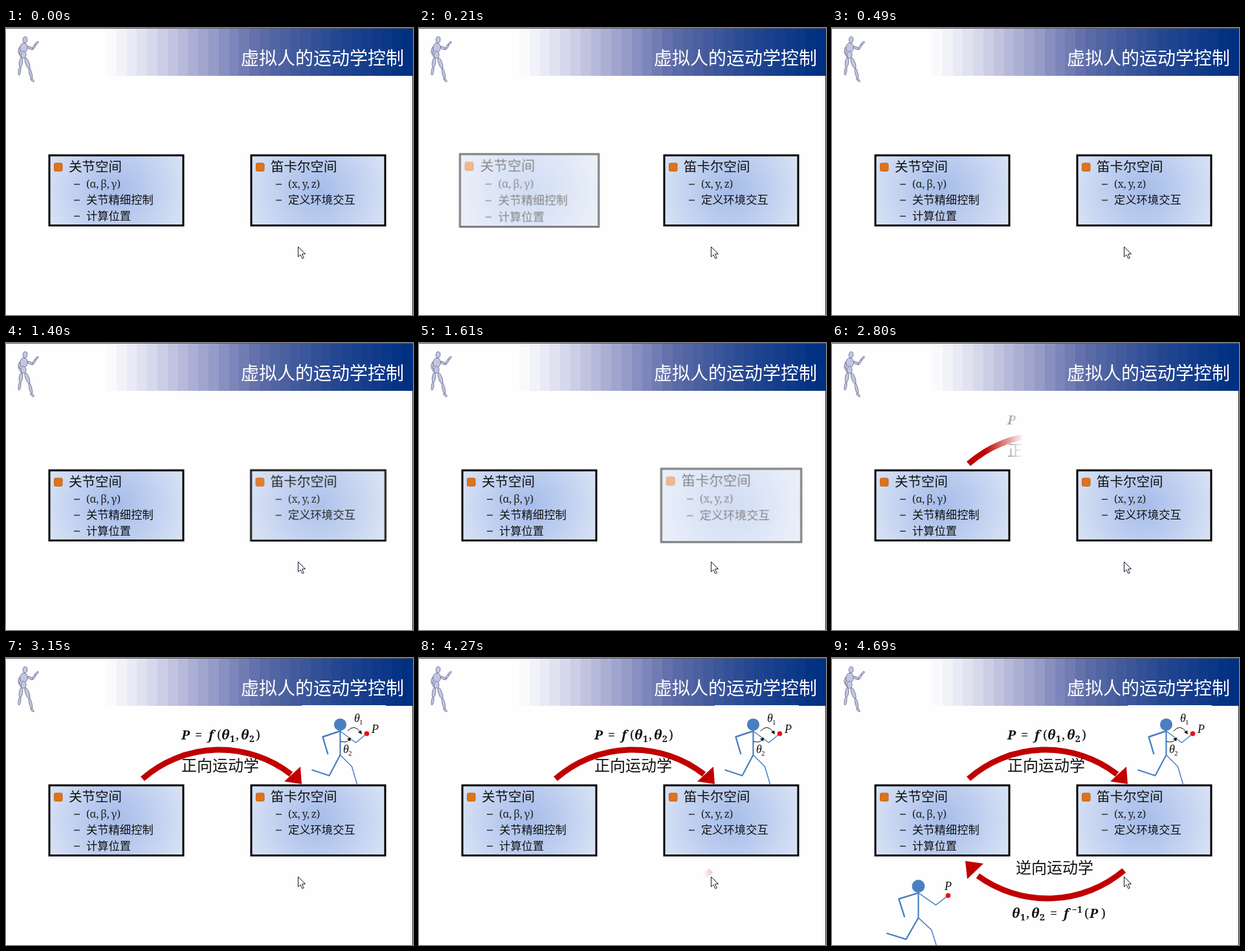
An HTML page with a canvas for the animation above (5530 ms loop, 629 px wide and 444 px high).

```html
<!DOCTYPE html>
<html lang="zh-CN">
<head>
<meta charset="utf-8">
<style>
html, body { margin: 0; width: 100%; height: 100%; overflow: hidden; background: #fff; }
canvas { display: block; }
</style>
</head>
<body>
<canvas id="stage" width="629" height="444"></canvas>
<script>
const W = 629, H = 444, LOOP = 5530, STEP = 70;
const SANS = '"Noto Sans CJK SC", "Noto Sans CJK", sans-serif';
const SERIF = '"Noto Serif", serif';
const TIMES = '"Liberation Serif", serif';
const ctx = document.getElementById('stage').getContext('2d');

function layer(draw) {
  const c = document.createElement('canvas');
  c.width = W;
  c.height = H;
  draw(c.getContext('2d'));
  return c;
}

function text(g, s, x, y, font, color = '#111') {
  g.font = font;
  g.fillStyle = color;
  g.fillText(s, x, y);
}

function path(g, pts, color, width) {
  g.beginPath();
  pts.forEach(([x, y]) => g.lineTo(x, y));
  g.strokeStyle = color;
  g.lineWidth = width;
  g.stroke();
}

function fillPath(g, pts, color) {
  g.beginPath();
  pts.forEach(([x, y]) => g.lineTo(x, y));
  g.closePath();
  g.fillStyle = color;
  g.fill();
}

function disc(g, x, y, r, color) {
  g.beginPath();
  g.arc(x, y, r, 0, 7);
  g.fillStyle = color;
  g.fill();
}

// Tapered, outlined body part between two joints
function limb(g, x1, y1, x2, y2, r) {
  const len = Math.hypot(x2 - x1, y2 - y1) / 2;
  g.beginPath();
  g.ellipse((x1 + x2) / 2, (y1 + y2) / 2, len, r, Math.atan2(y2 - y1, x2 - x1), 0, 7);
  g.fillStyle = '#c3c6e2';
  g.fill();
  g.strokeStyle = '#5d6080';
  g.lineWidth = 0.8;
  g.stroke();
}

function mannequin(g) {
  limb(g, 22, 29, 20, 39, 1.8);
  limb(g, 20, 38, 25, 46, 1.4);
  limb(g, 24, 46, 22, 61, 2.6);
  limb(g, 22, 60, 20, 73, 1.8);
  limb(g, 30, 46, 36, 63, 2.8);
  limb(g, 36, 62, 40, 79, 2);
  limb(g, 38, 78, 43, 83, 1.5);
  limb(g, 33, 29, 42, 33, 1.8);
  limb(g, 41, 33, 46, 25, 1.5);
  limb(g, 45, 26, 50, 21, 1.4);
  limb(g, 28, 23, 27, 38, 5.8);
  limb(g, 27, 36, 27, 47, 4);
  limb(g, 29, 23, 30, 13.5, 3.3);
}

const background = layer(g => {
  g.fillStyle = '#fefefe';
  g.fillRect(0, 0, W, H);

  const stops = [[0, 250, 250, 253], [.1, 226, 227, 241], [.35, 148, 153, 199],
    [.5, 94, 108, 168], [.75, 38, 72, 146], [1, 0, 48, 130]];
  const bands = 30;
  for (let i = 0; i < bands; i++) {
    const p = i / (bands - 1);
    const n = Math.max(1, stops.findIndex(s => s[0] >= p));
    const [a, b] = [stops[n - 1], stops[n]];
    const k = (p - a[0]) / (b[0] - a[0]);
    const rgb = [1, 2, 3].map(c => Math.round(a[c] + (b[c] - a[c]) * k));
    const x = Math.round(155 + i * 474 / bands);
    g.fillStyle = `rgb(${rgb})`;
    g.fillRect(x, 0, W - x, 74);
  }
  g.fillStyle = '#55565c';
  g.fillRect(0, 0, W, 1);
  g.fillStyle = '#222';
  g.fillRect(628, 74, 1, H - 74);

  text(g, '虚拟人的运动学控制', 363, 57, '28px ' + SANS, '#fff');
  mannequin(g);
});

function panel(g, x, title, triple, items) {
  const glow = g.createRadialGradient(x + 104, 251, 0, x + 104, 251, 118);
  glow.addColorStop(0, '#a5bce9');
  glow.addColorStop(.45, '#bccdef');
  glow.addColorStop(1, '#dbe4f5');
  g.fillStyle = glow;
  g.fillRect(x + 1, 197, 207, 109);
  g.strokeStyle = '#000';
  g.lineWidth = 3;
  g.strokeRect(x + 1, 197, 207, 108.5);

  g.beginPath();
  g.roundRect(x + 8.5, 209, 12.5, 12.5, 2);
  g.fillStyle = '#de731b';
  g.fill();
  g.strokeStyle = '#c4641a';
  g.lineWidth = 1;
  g.stroke();

  text(g, title, x + 31, 222, '20.5px ' + SANS);
  text(g, triple, x + 58, 247, '16px ' + SERIF, '#222');
  items.forEach((s, i) => text(g, s, x + 58, 272 + i * 24.5, '17.3px ' + SANS));
  g.fillStyle = '#333';
  for (let i = 0; i <= items.length; i++) g.fillRect(x + 39, 241 + i * 24.7, 9, 1.5);
}

const thin = '\u2009';
const panels = [
  { x: 66, start: 70, end: 490, args: ['关节空间', `(α,${thin}β,${thin}γ)`, ['关节精细控制', '计算位置']] },
  { x: 378, start: 1400, end: 1890, args: ['笛卡尔空间', `(x,${thin}y,${thin}z)`, ['定义环境交互']] }
];
for (const p of panels) p.image = layer(g => panel(g, p.x, ...p.args));

// Runner drawn around the centre of its head
function runner(g, x, y, sx, sy) {
  const at = pts => pts.map(([a, b]) => [x + a * sx, y + b * sy]);
  const blue = '#4a80c0';
  g.lineJoin = 'round';
  path(g, at([[0, 10], [-27, 19], [-19, 46]]), blue, 2.4);
  path(g, at([[0, 8], [0, 47], [-17, 79], [-44, 70]]), blue, 2.2);
  path(g, at([[0, 47], [18, 65], [26, 92]]), blue, 1.5);
  path(g, at([[0, 10], [24, 28], [41, 14]]), blue, 1.5);
  disc(g, x, y, 9.6 * sy, blue);
  disc(g, x + 41 * sx, y + 14 * sy, 3.8, '#e31018');
  g.lineJoin = 'miter';
}

function arcArrow(g, cx, cy, r, from, to, head) {
  g.beginPath();
  g.arc(cx, cy, r, from, to);
  g.strokeStyle = '#c00000';
  g.lineWidth = 9;
  g.stroke();
  fillPath(g, head, '#c00000');
}

function formula(g, y, parts) {
  for (const [s, x, kind] of parts) {
    const size = kind ? 14 : 20;
    const rise = kind === 'sup' ? -8 : kind === 'sub' ? 4 : 0;
    const style = /[Pfθ]/.test(s) ? 'italic bold' : kind ? 'bold' : '';
    text(g, s, x, y + rise, `${style} ${size}px ${SERIF}`);
  }
}

const forward = layer(g => {
  g.fillStyle = '#fefefe';
  g.fillRect(457, 73, 130, 122);
  arcArrow(g, 330, 322, 180, -2.293, -.91, [[457, 195], [455, 168], [430, 191]]);
  text(g, '正向运动学', 271, 175, '24px ' + SANS);
  formula(g, 126, [['P', 271], ['=', 292], ['f', 313], ['(', 326], ['θ', 333], ['1', 346, 'sub'],
    [',', 355], ['θ', 363], ['2', 376, 'sub'], [')', 386]]);

  runner(g, 516.5, 103, 1, 1);
  g.strokeStyle = '#111';
  g.lineWidth = 1;
  g.beginPath();
  g.moveTo(528, 113);
  g.quadraticCurveTo(538, 101, 548, 115);
  g.moveTo(517, 129);
  g.quadraticCurveTo(526, 132, 531, 126);
  g.stroke();
  fillPath(g, [[550, 118], [549, 112], [544, 115]], '#111');
  fillPath(g, [[533, 123], [527, 125], [532, 129]], '#111');
  text(g, 'θ', 538, 99, `italic 18px ${TIMES}`);
  text(g, '1', 546, 103, `11px ${TIMES}`);
  text(g, 'θ', 521, 147, `italic 18px ${TIMES}`);
  text(g, '2', 529, 151, `11px ${TIMES}`);
  text(g, 'P', 565, 116, `italic 18px ${TIMES}`);
});

const inverse = layer(g => {
  arcArrow(g, 333, 189, 183, .868, 2.2, [[206, 314], [209, 342], [234, 318]]);
  text(g, '逆向运动学', 284, 333, '24px ' + SANS);
  formula(g, 402, [['θ', 278], ['1', 291, 'sub'], [',', 300], ['θ', 308], ['2', 321, 'sub'],
    ['=', 337], ['f', 358], ['−1', 371, 'sup'], ['(', 390], ['P', 398], [')', 416]]);
  runner(g, 133.5, 353, 1.12, 1.04);
  text(g, 'P', 174, 359, `italic 18px ${TIMES}`);
});

function progress(t, start, end) {
  return t < start ? 0 : Math.min(1, .04 + .96 * (t - start) / (end - start));
}

function drawPanel(p, t) {
  const k = progress(t, p.start, p.end);
  const scale = 1 + .05 * (1 - Math.abs(2 * k - 1));
  const cx = p.x + 104.5, cy = 251;
  ctx.save();
  ctx.globalAlpha = 1 - .5 * Math.min(1, k / .2, (1 - k) / .2);
  ctx.translate(cx, cy);
  ctx.scale(scale, scale);
  ctx.drawImage(p.image, -cx, -cy);
  ctx.restore();
}

// Soft-edged reveal travelling from one x to another
const scratch = layer(() => {});
function wipe(image, k, from, to) {
  if (k <= 0) return;
  if (k >= 1) return ctx.drawImage(image, 0, 0);
  const g = scratch.getContext('2d');
  const soft = 60, dir = Math.sign(to - from);
  const front = from + (to - from + dir * soft) * k;
  const mask = g.createLinearGradient(front - dir * soft, 0, front, 0);
  mask.addColorStop(0, '#000');
  mask.addColorStop(1, 'rgba(0,0,0,0)');
  g.globalCompositeOperation = 'copy';
  g.drawImage(image, 0, 0);
  g.globalCompositeOperation = 'destination-in';
  g.fillStyle = mask;
  g.fillRect(0, 0, W, H);
  ctx.drawImage(scratch, 0, 0);
}

function cursor() {
  const shape = [[451.5, 338.5], [451.5, 354], [455, 350.8], [458, 356.8], [460.3, 355.6],
    [457.5, 349.8], [462.5, 349.5], [451.5, 338.5]];
  fillPath(ctx, shape, '#fff');
  path(ctx, shape, '#15152c', 1);
}

function render(t) {
  ctx.drawImage(background, 0, 0);
  wipe(forward, progress(t, 2730, 3150), 208, 587);
  wipe(inverse, progress(t, 4270, 4690), 457, 81);
  panels.forEach(p => drawPanel(p, t));
  cursor();
}

const began = performance.now();
function frame() {
  const t = (performance.now() - began) % LOOP;
  render(Math.floor(t / STEP) * STEP);
  requestAnimationFrame(frame);
}
frame();
</script>
</body>
</html>
```
